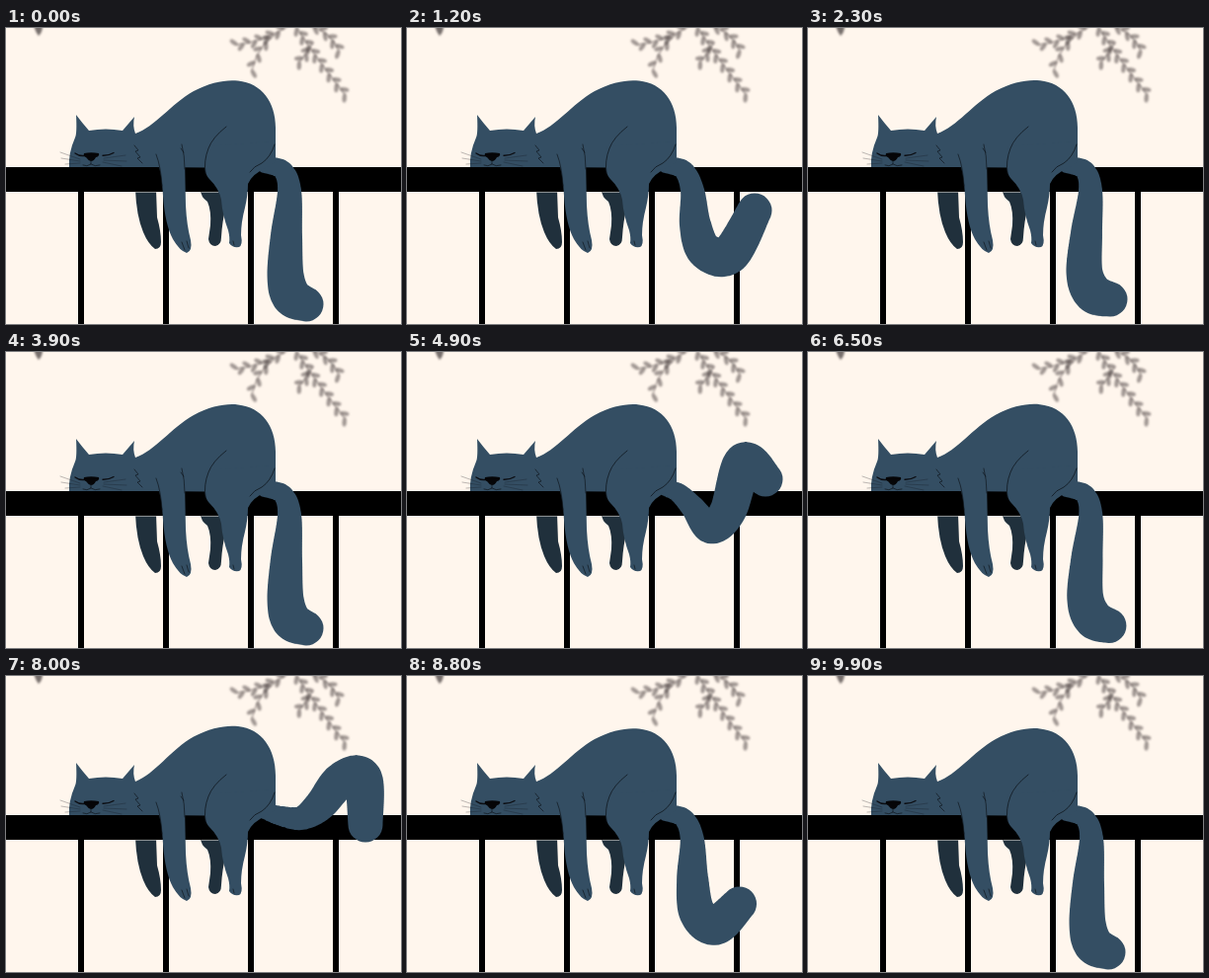
Write an HTML page with a canvas that moves like this. It is 400 px wide and 300 px high and loops after 10 s.

```html
<!DOCTYPE html>
<html lang="en">
<head>
<meta charset="utf-8">
<title>Sleepy cat</title>
<style>
  html, body { margin: 0; width: 100%; height: 100%; overflow: hidden; background: #fff6ed; }
  canvas { display: block; width: 400px; height: 300px; }
</style>
</head>
<body>
<canvas id="stage"></canvas>
<script>
const LOOP = 10000, BREATH = 1250;
const FUR = '#344e63', SHADE = '#20303c', PAPER = '#fff6ed', INK = '#10171f';

const canvas = document.getElementById('stage');
const ratio = window.devicePixelRatio || 1;
canvas.width = 400 * ratio;
canvas.height = 300 * ratio;
const ctx = canvas.getContext('2d');
ctx.scale(ratio, ratio);

// Tail centre line from root to tip, x and y in turn
const poses = {
  rest: [262, 139, 280, 144, 287, 165, 284, 210, 283, 250, 289, 272, 304, 280],
  rise: [262, 138, 279, 143, 297, 151, 314, 173, 321, 208, 326, 230, 332, 250],
  arch: [262, 137, 279, 142, 299, 144, 318, 131, 339, 106, 361, 104, 364, 151],
  curl: [262, 138, 275, 143, 289, 157, 307, 178, 325, 161, 341, 112, 363, 129],
  mid:  [262, 139, 280, 144, 289, 165, 292, 200, 302, 226, 327, 229, 352, 185],
  low:  [262, 139, 280, 144, 288, 165, 287, 208, 288, 246, 300, 264, 321, 263],
  down: [262, 139, 280, 144, 286, 165, 282, 208, 280, 248, 289, 269, 306, 275]
};
const radii = [8, 10, 12, 16, 18.5, 20, 17.5];

const steps = [
  [0, 'rest'], [300, 'rise'], [600, 'arch'], [900, 'curl'], [1200, 'mid'],
  [1700, 'low'], [2300, 'down'], [3200, 'rest'], [4000, 'rest'],
  [4300, 'rise'], [4600, 'arch'], [4900, 'curl'], [5250, 'mid'],
  [5800, 'low'], [6250, 'down'], [7000, 'rest'], [7400, 'rest'],
  [7700, 'rise'], [8000, 'arch'], [8300, 'curl'], [8600, 'mid'],
  [9000, 'low'], [9400, 'down'], [9900, 'rest'], [LOOP, 'rest']
];

// Tangent that never overshoots
const tangent = (a, b) => a * b <= 0 ? 0 : 2 * a * b / (a + b);

function tailAt(t) {
  let i = 0;
  while (i < steps.length - 2 && t >= steps[i + 1][0]) i++;
  const key = k => steps[Math.max(0, Math.min(steps.length - 1, k))];
  const slope = (k, c) => {
    const [t0, a] = key(k), [t1, b] = key(k + 1);
    return t1 > t0 ? (poses[b][c] - poses[a][c]) / (t1 - t0) : 0;
  };
  const [t0, a] = key(i), span = key(i + 1)[0] - t0, u = (t - t0) / span;
  return poses[a].map((p, c) => {
    const s = slope(i, c), q = p + s * span;
    const m0 = tangent(slope(i - 1, c), s) * span;
    const m1 = tangent(s, slope(i + 1, c)) * span;
    const w = u * u * (3 - 2 * u);
    return p + (q - p) * w + m0 * u * (1 - u) ** 2 - m1 * u * u * (1 - u);
  });
}

function spline(list, s) {
  const i = Math.min(Math.floor(s), list.length - 2), u = s - i;
  const at = k => list[Math.max(0, Math.min(list.length - 1, k))];
  const a = at(i - 1), b = at(i), c = at(i + 1), d = at(i + 2);
  return b + u * (c - a + u * (2 * a - 5 * b + 4 * c - d + u * (3 * (b - c) + d - a))) / 2;
}

function drawTail(t) {
  const p = tailAt(t), n = 180;
  const xs = p.filter((_, i) => i % 2 === 0), ys = p.filter((_, i) => i % 2);
  ctx.beginPath();
  for (let i = 0; i <= n; i++) {
    const s = i / n * (radii.length - 1);
    const x = spline(xs, s), y = spline(ys, s), r = spline(radii, s);
    ctx.moveTo(x + r, y);
    ctx.arc(x, y, r, 0, 2 * Math.PI);
  }
  ctx.fillStyle = FUR;
  ctx.fill();
}

function fill(d, color) {
  ctx.fillStyle = color;
  ctx.fill(new Path2D(d));
}

function line(d, width = 0.8, color = INK) {
  ctx.strokeStyle = color;
  ctx.lineWidth = width;
  ctx.lineCap = 'round';
  ctx.stroke(new Path2D(d));
}

// Stems: start, control, end, number of leaves
const stems = [
  [287, -3, 264, 13, 234, 17, 9],
  [274, 6, 256, 16, 249, 43, 6],
  [292, -4, 312, 28, 343, 67, 15],
  [306, -3, 328, 3, 337, 23, 7],
  [310, 16, 304, 27, 297, 34, 4]
];

function drawLeaves() {
  ctx.save();
  ctx.filter = `blur(${1.1 * ratio}px)`;
  for (const [x0, y0, cx, cy, x1, y1, n] of stems) {
    line(`M${x0} ${y0}Q${cx} ${cy} ${x1} ${y1}`, 1.3, 'rgba(75,65,65,.5)');
    ctx.fillStyle = 'rgba(75,65,65,.52)';
    for (let i = 1; i <= n; i++) {
      const u = i / n, v = 1 - u, side = i % 2 ? 1 : -1;
      const x = v * v * x0 + 2 * u * v * cx + u * u * x1;
      const y = v * v * y0 + 2 * u * v * cy + u * u * y1;
      const dir = Math.atan2(v * (cy - y0) + u * (y1 - cy), v * (cx - x0) + u * (x1 - cx));
      const a = dir + side * 0.75;
      ctx.beginPath();
      ctx.ellipse(x + 4 * Math.cos(a), y + 4 * Math.sin(a), 4.6, 2.2, a, 0, 2 * Math.PI);
      ctx.fill();
    }
  }
  fill('M28 -2L37 -2Q37 4 33 8Q30 4 28 -2Z', 'rgba(60,52,52,.7)');
  ctx.restore();
}

function drawFence() {
  ctx.fillStyle = '#000';
  for (let x = 73; x < 400; x += 86) ctx.fillRect(x, 160, 6, 140);
  fill('M131 164Q132 190 139 207Q144 219 151 224Q157 224 157 217Q157 206 153 192L152 164Z', SHADE);
  fill('M197 164Q197 171 204 176Q208 185 207 200L205 214Q206 221 212 221Q218 220 218 212Q219 195 223 180L223 164Z', SHADE);
  ctx.fillStyle = '#000';
  ctx.fillRect(0, 141, 400, 25);
  line('M131 166.4H152M198 166.4H215', 0.7, '#c9c7c4');
}

function drawBody(b) {
  fill(`M64 141Q63 127 70 111Q72 107 71 88Q77 96 84 104Q101 101 118 104L130 90Q128 99 131 107
    C151 ${100 - b / 3} 167 ${77 - b} 190 ${64 - b} C207 ${55 - b} 223 ${52 - b} 235 ${53.5 - b}
    C259 ${56 - b} 273 ${75 - b / 2} 273 101 L273 134 Q270 141 258 142 L150 141Z`, FUR);
  fill('M152 130Q158 147 159 170Q161 199 169 214Q176 226 183 228Q189 226 187 215Q183 200 182 180L181 130Z', FUR);
  fill(`M203 120Q198 143 205 152Q216 163 218 174Q219 189 225 205Q227 213 226 218Q229 223 236 222
    Q240 220 238 210Q238 197 242 182Q245 169 245 158Q249 148 266 140L266 115Z`, FUR);

  line('M223 100Q209 111 205 122Q200 135 202 147');
  line('M272 118Q268 131 259 137Q251 140 247 146');
  line('M152 128Q157 141 158 160M178 118Q181 129 181 143', 0.7);
  line('M130 119L134 124L131 125L136 131L133 132L138 137', 0.7);
  line('M177 122L180 126M178 217L181 225M183 216L185 223M230 216L231 220', 0.7);
}

function drawFace() {
  line('M70 127Q74 130 79 129.5M98 129.3Q104 129.5 109 126.5', 1.4, '#0b0d12');
  fill('M79 127Q86 125.5 94 127Q95 130 91 131Q89 135 86 135Q83 134 81 131Q78 130 79 127Z', '#050507');
  line('M86 134V138Q82 141 78 139M86 138Q90 141 95 139', 0.7);
  line('M75 133L55 126M75 135L56 132M75 137L60 138M99 132L121 129M99 134L122 135M98 136L117 140', 0.4, 'rgba(15,20,28,.7)');
}

function draw(t) {
  ctx.fillStyle = PAPER;
  ctx.fillRect(0, 0, 400, 300);
  drawLeaves();
  drawFence();
  drawTail(t);
  const lift = (1 - Math.cos(2 * Math.PI * t / BREATH)) / 2;
  drawBody(3 * lift * lift);
  drawFace();
}

const start = performance.now();
function tick() {
  const t = (performance.now() - start) % LOOP;
  draw(Math.floor(t / 100) * 100);
  requestAnimationFrame(tick);
}
tick();
</script>
</body>
</html>
```
